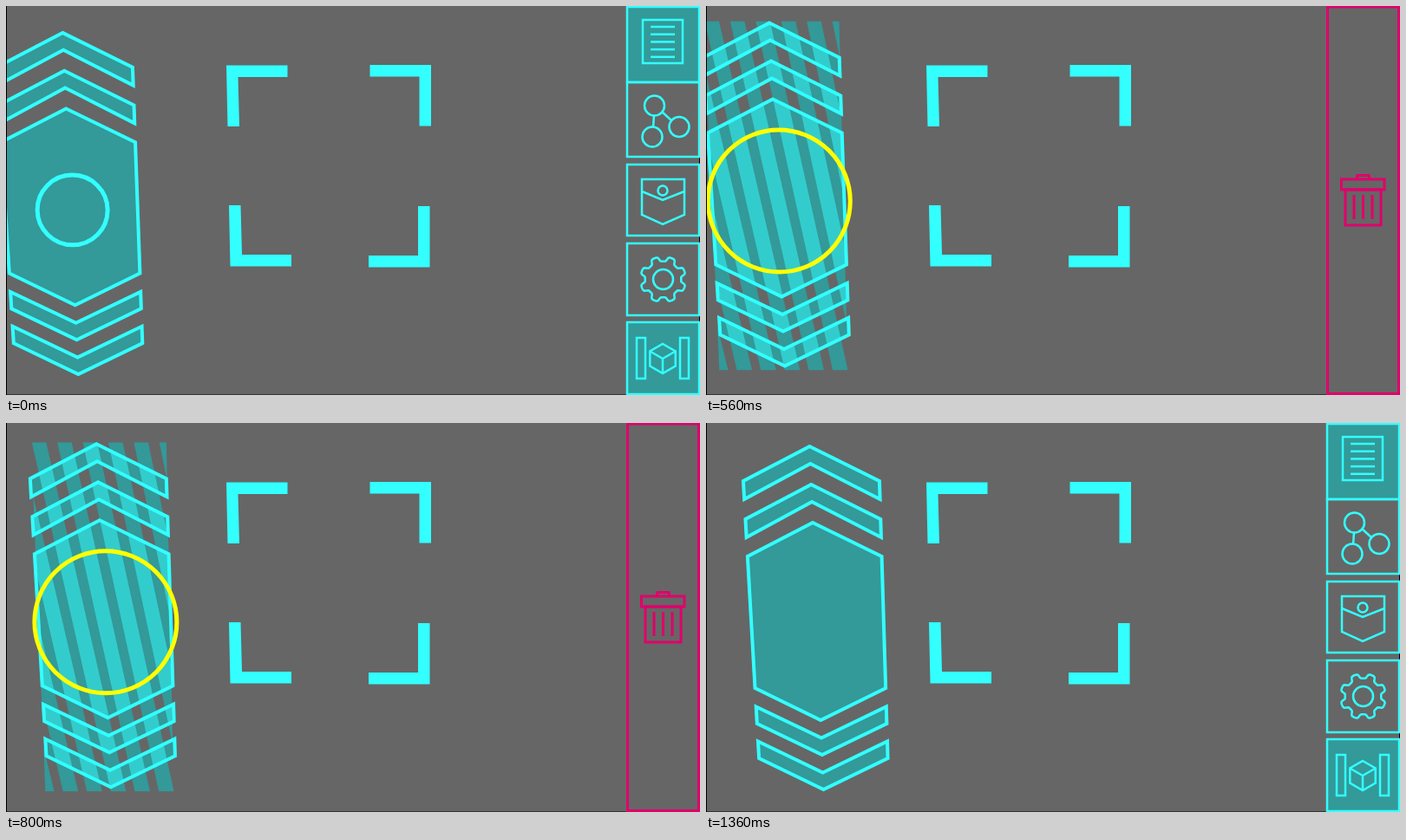
These frames come from a looping animation (800 by 449 pixels, 3440 ms). An HTML page with a canvas:

```html
<!DOCTYPE html>
<html>
<head>
<meta charset="utf-8">
<style>
  html, body { margin: 0; width: 100%; height: 100%; overflow: hidden; background: #666; }
  canvas { display: block; }
</style>
</head>
<body>
<canvas id="stage" width="800" height="449"></canvas>
<script>
const ctx = document.getElementById('stage').getContext('2d');
const CYAN = '#33ffff', TEAL = '#339999', LIGHT = '#33cccc', PINK = '#e0006b', YELLOW = '#ffff00';
const LOOP = 3440, STEP = 80, GRAB = 240, DROP = 1200, LEAVE = 1280;

function poly(points, closed = true) {
  const p = new Path2D();
  for (let i = 0; i < points.length; i += 2) p.lineTo(points[i], points[i + 1]);
  if (closed) p.closePath();
  return p;
}

const outline = (...points) => ctx.stroke(poly(points));
const line = (...points) => ctx.stroke(poly(points, false));

function fill(shape, color) {
  ctx.fillStyle = color;
  ctx.fill(shape);
}

function pen(color, width) {
  ctx.strokeStyle = color;
  ctx.lineWidth = width;
}

function circle(x, y, r) {
  ctx.beginPath();
  ctx.arc(x, y, r, 0, 2 * Math.PI);
  ctx.stroke();
}

// Points around a centre, with a radius that may depend on the angle
function ring(x, y, count, radius) {
  const points = [];
  for (let i = 0; i < count; i++) {
    const a = 2 * Math.PI * i / count - Math.PI / 2;
    points.push(x + radius(a) * Math.cos(a), y + radius(a) * Math.sin(a));
  }
  return points;
}

// The column is seen in perspective: its axis and both sides lean
const axis = y => 119.5 + 0.0404 * (y - 27);
const left = y => 43 + 0.0567 * (y - 67);
const right = y => 200 + 0.03 * (y - 67);

// A band bent at the axis, given by the heights of its two edges
const band = (mid1, side1, side2, mid2) => poly([
  axis(mid1), mid1, right(side1), side1, right(side2), side2,
  axis(mid2), mid2, left(side2), side2, left(side1), side1
]);

const bands = [
  ...[27, 71].map(y => band(y, y + 40, y + 61, y + 20)),
  band(115, 154, 306, 343),
  ...[363.5, 403.5].map(y => band(y, y - 36, y - 16.5, y + 19.5))
];
const columnArea = new Path2D();
bands.forEach(b => columnArea.addPath(b));

const stripeArea = poly([44,25, 200,25, 208,428, 60,428]);
const stripes = new Path2D();
for (let k = -4; k < 6; k++) {
  const top = 45 + 29.4 * k, bottom = 135.5 + 27.6 * k;
  stripes.addPath(poly([top,25, top + 16.5,25, bottom + 17.5,428, bottom,428]));
}

const gear = ring(757.5, 315.5, 160, a => 23.5 - 2.8 * Math.tanh(2.5 * Math.cos(8 * a)));
const cube = ring(757, 407, 6, () => 17);

// Falls smoothly from 1 to 0 around a moment
const fall = (t, moment, span) => 1 / (1 + Math.exp((t - moment) / span));

function drawColumn(t, dragging) {
  const lift = 11.5 * fall(t, 300, 20);
  const dx = -54.3 * fall(t, 717, 88);
  const dy = lift - 7.6 * fall(t, 775, 45);
  const skew = -dx * 1e-4, scale = 1 - lift / 2400;

  ctx.save();
  ctx.transform(1, 0, skew, scale, dx - skew * 26, dy + 26 * (1 - scale));
  if (dragging) {
    ctx.save();
    ctx.clip(stripeArea);
    fill(stripes, TEAL);
    ctx.restore();
  }
  fill(columnArea, TEAL);
  if (dragging) {
    ctx.save();
    ctx.clip(stripeArea);
    ctx.clip(columnArea);
    fill(stripes, LIGHT);
    ctx.restore();
  }
  pen(CYAN, 4);
  bands.forEach(b => ctx.stroke(b));
  if (t < LEAVE) {
    pen(dragging ? YELLOW : CYAN, 5);
    circle(129.8, 232.5, dragging ? 82 : 40.5);
  }
  ctx.restore();
}

// An L-shaped corner; sx and sy point along its arms
function drawBracket(x, y, sx, sy) {
  const arm = 70.5, thick = 13.5, lean = sx > 0 ? 1.5 * sy : 0;
  fill(poly([
    x, y, x + arm * sx, y, x + arm * sx, y + thick * sy, x + thick * sx, y + thick * sy,
    x + thick * sx + lean, y + arm * sy, x + lean, y + arm * sy
  ]), CYAN);
}

function drawBrackets() {
  drawBracket(254, 68.5, 1, 1);
  drawBracket(490, 68, -1, 1);
  drawBracket(258.5, 300.5, 1, -1);
  drawBracket(488.5, 301.5, -1, -1);
}

function drawButton(y, h, active) {
  ctx.fillStyle = TEAL;
  if (active) ctx.fillRect(716, y, 83, h);
  ctx.strokeRect(716, y, 83, h);
}

function drawMenu() {
  pen(CYAN, 2.5);

  // Document
  drawButton(1, 87, true);
  ctx.strokeRect(734, 16, 46, 50);
  for (let i = 0; i < 5; i++) line(743, 24 + 8.7 * i, 771, 24 + 8.7 * i);

  // Linked nodes
  drawButton(88, 86);
  circle(747.5, 115, 11.5);
  circle(776, 139.5, 11.5);
  circle(745, 151, 11.5);
  line(756, 122, 767, 132);
  line(747, 126, 746, 140);

  // Pocket
  drawButton(183, 82);
  outline(733, 200, 782, 200, 782, 241, 757, 252, 733, 241);
  line(733, 214, 757, 224, 782, 214);
  circle(757, 213, 5.5);

  // Gear
  drawButton(274, 83);
  outline(...gear);
  circle(757.5, 315.5, 11.5);

  // Cube between bars
  drawButton(365, 83, true);
  for (const x of [727, 777]) ctx.strokeRect(x, 383, 10, 47);
  outline(...cube);
  for (const i of [1, 3, 5]) line(757, 407, cube[2 * i], cube[2 * i + 1]);
}

function drawTrash() {
  pen(PINK, 3);
  ctx.strokeRect(716.5, 1, 82, 446.5);
  ctx.strokeRect(732.5, 200, 49.5, 12);
  ctx.strokeRect(737, 212, 41, 41);
  line(750, 200, 751, 195.5, 764, 195.5, 765, 200);
  for (const x of [747, 757.5, 768]) line(x, 218, x, 246);
}

function rect(color, x, y, w, h) {
  ctx.fillStyle = color;
  ctx.fillRect(x, y, w, h);
}

function draw(t) {
  const dragging = t >= GRAB && t < DROP;
  rect('#666', 0, 0, 800, 449);
  rect('#333', 0, 448, 800, 1);
  rect('#000', 799, 0, 1, 449);
  drawColumn(t, dragging);
  drawBrackets();
  if (dragging) drawTrash(); else drawMenu();
  rect('#000', 0, 0, 1, 449);
}

const start = performance.now();
function tick() {
  const t = (performance.now() - start) % LOOP;
  draw(Math.floor(t / STEP) * STEP);
  requestAnimationFrame(tick);
}
tick();
</script>
</body>
</html>
```
